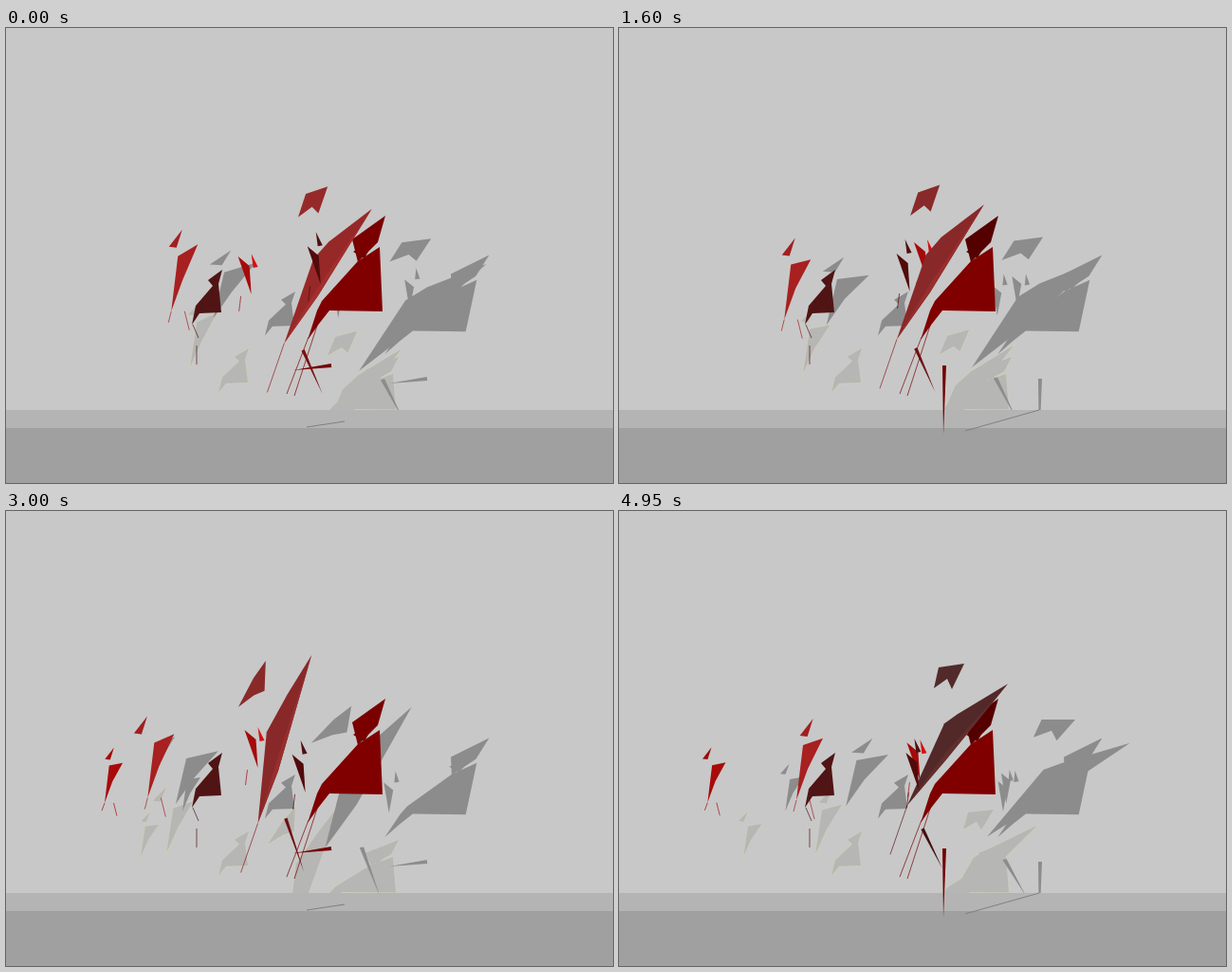
An HTML page with a canvas that plays this animation: 640x480 px, repeating every 5000 ms.

```html
<!DOCTYPE html>
<html lang="en">
<head>
<meta charset="utf-8">
<title>Paper birds</title>
<style>
html, body { margin: 0; width: 100%; height: 100%; overflow: hidden; background: #c8c8c8; }
canvas { display: block; width: 640px; height: 480px; }
</style>
</head>
<body>
<canvas id="stage" width="640" height="480"></canvas>
<script>
const ctx = document.getElementById('stage').getContext('2d');
const LOOP = 5000, STEP = 50, WALL = 403;
const CYCLE = 3750, HOP = 2800;

const mix = (a, b, k) => a + (b - a) * k;
const ramp = (t, from, to) => Math.min(1, Math.max(0, (t - from) / (to - from)));
const ease = (t, from, to) => { const u = ramp(t, from, to); return u * u * (3 - 2 * u); };
const wave = (t, period, peak) => Math.cos(2 * Math.PI * (t - peak) / period);
const rgb = (r, g) => `rgb(${Math.round(r)},${Math.round(g)},${Math.round(g)})`;

// "x,y x,y ..." to points
const pts = text => text.split(' ').map(p => p.split(',').map(Number));
const blend = (a, b, k, dy = 0) => a.map(([x, y], i) => [mix(x, b[i][0], k), mix(y, b[i][1], k) + dy]);
const place = (shape, x, y, size = 1) => shape.map(([px, py]) => [x + px * size, y + py * size]);

// Affine projections onto the wall: x' = a x + c y + e, y' = b x + d y + f
const casts = {
  front: { dark: [1, 0, -.215, .8, 152, 81], pale: [1, 0, 0, .55, 14, 238] },
  leg: { dark: [1, 0, 0, 1, 101, 14] },
  hop: { dark: [1.3, .13, -.1, .88, 24, 31], pale: [1, 0, 0, .8, 31, 186] },
  still: { dark: [1, 0, 0, .8, 77, 74], pale: [1, 0, 0, .8, 28, 134] },
  walk: { dark: [1.6, 0, 0, .83, -60, 58], pale: [1, 0, 0, .8, 20, 118] },
  guest: { dark: [1, 0, 0, .85, 82, 55], pale: [1, 0, 0, .8, 38, 118] },
  small: { dark: [1, 0, -.215, .8, 152, 81] }
};

let shapes = [];
const add = (cast, color, list) => shapes.push({ cast: casts[cast], color, list });
const thread = (color, x1, y1, x2, y2) => shapes.push({ color, thread: [x1, y1, x2, y2] });

// A limb narrows to its foot.
function limb(cast, color, [x1, y1], [x2, y2], width = 4) {
  const k = width / 2 / Math.hypot(x2 - x1, y2 - y1);
  const nx = (y1 - y2) * k, ny = (x2 - x1) * k;
  add(cast, color, [[x1 + nx, y1 + ny], [x1 - nx, y1 - ny], [x2, y2]]);
}

const walkWing = pts('7,-58 28,-72 12,-33 0,0');
const walkHead = pts('0,0 -14,18 -6,19');

function walker(t, o) {
  const lean = wave(t, o.period, o.peak), bob = wave(t, CYCLE / 2, o.beat);
  const x = o.x + o.sway * lean, y = o.y + 12 * bob, n = o.size;
  const wing = place(walkWing, x, y, n);
  wing[1][1] += 10 * bob * n;
  add(o.cast, rgb(168, o.tint), wing);
  add(o.cast, rgb(160, o.tint), place(walkHead, x + (9 + 11 * lean) * n, y - 86 * n, n));
  thread(rgb(168, o.tint), x, y, x - 3, y + 12 * n);
  thread(rgb(168, o.tint), x + 14 * n, y, x + 19 * n, y + 20 * n);
}

const smallWing = pts('-14,-40 -2,-30 0,0');
const smallHead = pts('0,0 7,14 2,15');

function small(t, o) {
  const sway = wave(t, CYCLE, o.peak), bob = wave(t, o.bobPeriod, o.beat);
  const x = o.x + o.sway * sway, y = o.y + 14 * bob;
  add('small', rgb(o.red, 10), place(smallWing, x, y));
  add('small', rgb(o.headRed, 15), place(smallHead, x + o.headX, y - o.headUp));
  thread(rgb(o.red, 10), x - 11, y + 2, x - 13, y + 18);
}

const restBody = pts('228,255 213,266 218,272 200,293 196,313 204,301 227,300 224,270');

function rester() {
  add('still', '#501414', restBody);
  thread('#501414', 197, 313, 203, 327);
  thread('#501414', 201, 335, 201, 355);
}

const frontBody = pts('394,231 397,299 341,298 330,312 318,329 328,298 333,288 371,246');
const headDown = pts('400,198 365,223 371,247 392,226');
const headUp = pts('355,165 331,203 331,228 341,203');
const wingShut = pts('388,245 390,252 345,292 335,297 345,282');
const wingOpen = pts('353,225 383,245 322,303 305,325 331,245');
const collar = pts('388,224 366,236 378,243');

function frontBird(t) {
  const p = t % CYCLE;
  const flap = ease(p, 250, 700) - ease(p, 750, 1150);
  const lift = 1 - ease(p, 150, 600) + ease(p, 2300, 2900);
  const red = mix(85, 122, Math.max(lift, flap));
  add('front', rgb(85, 0), collar);
  add('front', rgb(red, 0), blend(headDown, headUp, flap));
  add('front', '#800000', frontBody);
  add('front', '#800000', blend(wingShut, wingOpen, flap));
  thread('#780000', 319, 326, 296, 386);
  thread('#780000', 328, 314, 304, 388);
  limb('leg', rgb(115, 0), [343, 356], [mix(342, 303, lift), mix(429, 361, lift)]);
  return lift;
}

const wingLeft = pts('298,121 280,165 256,213 255,312 271,255');
const wingRight = pts('410,182 357,214 343,224 304,310 345,262');
const crestLeft = pts('249,148 240,170 221,203 238,190 251,181');
const crestRight = pts('364,161 337,165 332,187 346,177 351,188');
const legLeft = pts('288,311 307,372');
const legRight = pts('320,335 341,377');

function hopper(t) {
  const p = t % HOP;
  const out = Math.sin(ramp(p, 950, 2100) * Math.PI / 2);
  const side = p < 950 ? 1 - ease(p + HOP, 2650, 3150) : out - ease(p, 2650, 3150);
  const dip = (1 + wave(t, HOP / 2, 0)) / 2;
  const red = mix(82, 150, dip);
  const wing = blend(wingLeft, wingRight, side, 22 * dip);
  const [tip, , shoulder, tail, inner] = wing;
  const [hip, foot] = blend(legLeft, legRight, side, 10 * dip);
  limb('hop', rgb(red * .8, 15), hip, foot, 3.5);
  add('hop', rgb(red, 40), wing);
  const [fold] = blend([inner], [shoulder], .2);
  shapes.push({ color: rgb(red + 14, 46), list: [tip, inner, tail, fold] });
  add('hop', rgb(red, 42), blend(crestLeft, crestRight, side, 9 * dip));
  thread(rgb(red, 30), ...tail, tail[0] - 18, tail[1] + 52);
}

const early = { x: 169, sway: 23, period: CYCLE, peak: 800, y: 297, beat: 1450, size: 1, tint: 32, cast: 'walk' };
const late = { x: 97, sway: 14, period: 3600, peak: 2400, y: 296, beat: 3000, size: .68, tint: 10, cast: 'guest' };
const bright = { x: 290, sway: 35, peak: 1600, y: 280, bobPeriod: CYCLE / 3, beat: 950, red: 165, headRed: 215, headX: 0, headUp: 43 };
const dark = { x: 317, sway: 16, peak: 240, y: 284, bobPeriod: CYCLE / 2, beat: 1000, red: 82, headRed: 80, headX: -5, headUp: 55 };

function trace(list, m = [1, 0, 0, 1, 0, 0]) {
  ctx.beginPath();
  for (const [x, y] of list)
    ctx.lineTo(m[0] * x + m[2] * y + m[4], m[1] * x + m[3] * y + m[5]);
  ctx.closePath();
}

function line([x1, y1, x2, y2], color, width) {
  ctx.beginPath();
  ctx.moveTo(x1, y1);
  ctx.lineTo(x2, y2);
  ctx.strokeStyle = color;
  ctx.lineWidth = width;
  ctx.stroke();
}

function drawShadows() {
  const paled = shapes.filter(s => s.cast && s.cast.pale);
  ctx.save();
  ctx.beginPath();
  ctx.rect(0, 0, 640, WALL);
  ctx.clip();
  ctx.strokeStyle = '#cdcdb9';
  ctx.lineWidth = 1.5;
  for (const s of paled) {
    trace(s.list, s.cast.pale);
    ctx.stroke();
  }
  ctx.fillStyle = '#b6b6b4';
  for (const s of paled) {
    trace(s.list, s.cast.pale);
    ctx.fill();
  }
  ctx.fillStyle = '#8c8c8c';
  for (const s of shapes) {
    if (!s.cast) continue;
    trace(s.list, s.cast.dark);
    ctx.fill();
  }
  ctx.restore();
}

function drawRoom() {
  const band = (color, y, h) => { ctx.fillStyle = color; ctx.fillRect(0, y, 640, h); };
  band('#c8c8c8', 0, WALL);
  band('#b4b4b4', WALL, 19);
  band('#a0a0a0', 422, 58);
}

function draw(t) {
  shapes = [];
  small(t, bright);
  rester();
  walker(t, early);
  if (t >= 1900) walker(t, late);
  const lift = frontBird(t);
  hopper(t);
  small(t, dark);

  drawRoom();
  drawShadows();
  line([mix(443, 357, lift), mix(WALL, 415, lift), mix(365, 317, lift), mix(425, 421, lift)], '#808080', 1);
  for (const s of shapes) {
    if (s.thread) {
      line(s.thread, s.color, .7);
      continue;
    }
    trace(s.list);
    ctx.fillStyle = s.color;
    ctx.fill();
  }
}

function tick() {
  draw(Math.floor(performance.now() % LOOP / STEP) * STEP);
  requestAnimationFrame(tick);
}
tick();
</script>
</body>
</html>
```
